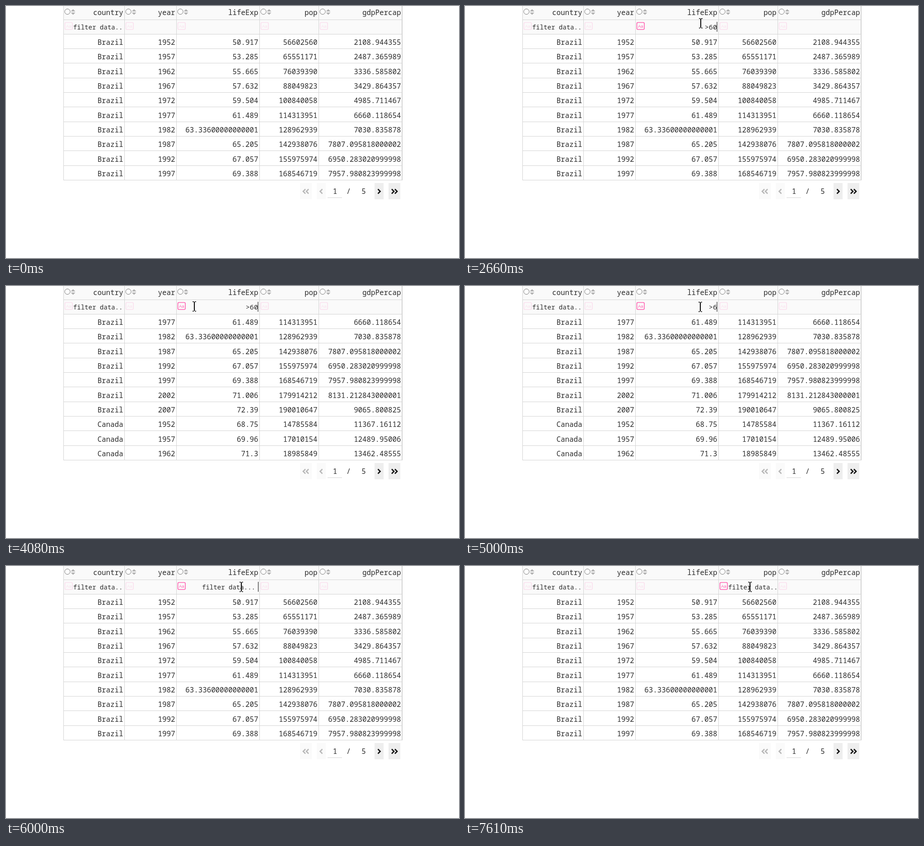
These frames come from a looping animation (1003 by 558 pixels, 8000 ms). An HTML page with a canvas:

```html
<!DOCTYPE html>
<html lang="en">
<head>
<meta charset="utf-8">
<title>Filterable data table</title>
<style>
html, body { margin: 0; width: 100%; height: 100%; overflow: hidden; background: #fff; }
canvas { display: block; }
</style>
</head>
<body>
<canvas id="stage" width="1003" height="558"></canvas>
<script>
const ctx = document.getElementById('stage').getContext('2d');
const LOOP = 8000, TICK = 67, BLINK = 525;
const MONO = '"Noto Sans Mono", "DejaVu Sans Mono", monospace';
const INK = '#2c2c2c', LINE = '#d3d3d3', PINK = '#ff5fb0';
const LIFE = 2, POP = 3;
const edges = [127, 262, 377, 561, 692, 877];
const headings = ['country', 'year', 'lifeExp', 'pop', 'gdpPercap'];
const lineY = k => Math.round(29.5 + 32.3 * k);
const textY = row => Math.round(86 + 32.35 * row);

// lifeExp, pop and gdpPercap for every fifth year from 1952
const history = {
  Brazil: `50.917 56602560 2108.944355
    53.285 65551171 2487.365989
    55.665 76039390 3336.585802
    57.632 88049823 3429.864357
    59.504 100840058 4985.711467
    61.489 114313951 6660.118654
    63.33600000000001 128962939 7030.835878
    65.205 142938076 7807.095818000002
    67.057 155975974 6950.283020999998
    69.388 168546719 7957.980823999998
    71.006 179914212 8131.212843000001
    72.39 190010647 9065.800825`,
  Canada: `68.75 14785584 11367.16112
    69.96 17010154 12489.95006
    71.3 18985849 13462.48555`
};
const records = Object.entries(history).flatMap(([country, lines]) =>
  lines.split('\n').map((line, i) => [country, 1952 + 5 * i, ...line.trim().split(' ')]));
const longLived = records.filter(record => record[2] > 60);

// Pointer moves: start, arrival, x, y
const moves = [
  [130, 260, 645, 42],
  [530, 730, 512, 39],
  [870, 940, 522, 38],
  [3680, 4010, 411, 45],
  [4080, 4490, 521, 46],
  [6610, 7150, 631, 46]
];
const clicks = [[940, LIFE], [7080, POP]];
const typing = [[1860, '>'], [2460, '>6'], [2660, '>60'], [5000, '>6'], [5200, '']];

const latest = (events, t) => events.filter(e => e[0] <= t).pop();
const smooth = p => p * p * (3 - 2 * p);

function pointerAt(t) {
  if (t < moves[0][0]) return null;
  let x = 794, y = 288;
  for (const [start, end, toX, toY] of moves) {
    if (t < start) break;
    const steps = Math.round((end - start) / TICK) + 1;
    const step = Math.floor((t - start + 8) / TICK) + 1;
    const p = smooth(Math.min(1, step / steps));
    x += (toX - x) * p;
    y += (toY - y) * p;
  }
  return [Math.round(x), Math.round(y)];
}

// The blink restarts on each click and each added character
function caretVisible(t) {
  const added = typing.filter(([, value], i) => value.length > i);
  const restarts = [...clicks, ...added].map(e => e[0]).filter(start => start <= t);
  return restarts.length > 0 && Math.floor((t - Math.max(...restarts)) / BLINK) % 2 === 0;
}

function rect(x, y, w, h, color) {
  ctx.fillStyle = color;
  ctx.fillRect(x, y, w, h);
}

function text(value, x, y, size, align = 'right') {
  ctx.font = `${size}px ${MONO}`;
  ctx.textAlign = align;
  ctx.fillStyle = INK;
  ctx.fillText(value, x, y);
}

const cellText = (value, col, y) => text(value, edges[col + 1] - 2.6, y, 15.8);

function triangle(x, y, height) {
  ctx.beginPath();
  ctx.moveTo(x - 5, y);
  ctx.lineTo(x + 5, y);
  ctx.lineTo(x, y + height);
  ctx.fill();
}

function heading(label, col) {
  const x = edges[col];
  ctx.beginPath();
  ctx.arc(x + 9, 12.5, 6, 0, 7);
  ctx.fillStyle = '#fff';
  ctx.fill();
  ctx.strokeStyle = '#767676';
  ctx.lineWidth = 1;
  ctx.stroke();
  ctx.fillStyle = '#b0b0b0';
  triangle(x + 21.5, 12, -5);
  triangle(x + 21.5, 14.5, 5);
  cellText(label, col, 20);
}

function caseIcon(x, active) {
  ctx.save();
  ctx.globalAlpha = active ? 1 : 0.17;
  ctx.strokeStyle = PINK;
  ctx.lineWidth = 1.6;
  ctx.beginPath();
  ctx.roundRect(x + 3.5, 36.5, 16.5, 15.5, 2.5);
  ctx.stroke();
  ctx.font = '9.5px "Liberation Sans", Arial, sans-serif';
  ctx.textAlign = 'center';
  ctx.fillStyle = PINK;
  ctx.fillText('Aa', x + 11.8, 47.5);
  ctx.restore();
}

function placeholder(col) {
  const x = col === LIFE ? 434 : edges[col] + 21.8;
  ctx.save();
  ctx.beginPath();
  ctx.rect(x, 31, edges[col + 1] - 2 - x, 31);
  ctx.clip();
  text('filter data...', x, 52, 14.05, 'left');
  ctx.restore();
}

function filterRow(t, pointer) {
  const hovered = pointer && pointer[1] > 30 && pointer[1] < 62
    ? edges.findIndex((x, i) => pointer[0] >= x && pointer[0] < edges[i + 1]) : -1;
  const focused = latest(clicks, t)?.[1];
  const typed = latest(typing, t)?.[1] ?? '';
  headings.forEach((_, col) => {
    caseIcon(edges[col], col === hovered);
    const empty = col !== LIFE || !typed;
    if (empty && (col === 0 || col === hovered || col === focused)) placeholder(col);
  });
  text(typed, 558, 52, 15.2);
  if (caretVisible(t))
    rect(focused === POP ? 689 : typed ? 557.5 : 558, 35, 1, 22, '#000');
}

function chevron(x, direction, color) {
  ctx.strokeStyle = color;
  ctx.lineWidth = 2.7;
  ctx.beginPath();
  ctx.moveTo(x - 2.5 * direction, 405.5);
  ctx.lineTo(x + 2.5 * direction, 410.5);
  ctx.lineTo(x - 2.5 * direction, 415.5);
  ctx.stroke();
}

function pagerButton(x, width, direction, count, enabled) {
  rect(x, 392, width, 36, enabled ? '#eee' : '#fafafa');
  for (let i = 0; i < count; i++)
    chevron(x + width / 2 + 7 * (i - (count - 1) / 2), direction, enabled ? '#111' : '#b8b8b8');
}

function pager() {
  pagerButton(651, 26, -1, 2, false);
  pagerButton(688, 20, -1, 1, false);
  pagerButton(816, 20, 1, 1, true);
  pagerButton(847, 26, 1, 2, true);
  text('1', 728.5, 416, 15.8, 'center');
  text('/', 758.5, 416, 15.8, 'center');
  text('5', 792, 416, 15.8, 'center');
  rect(712, 424, 32, 1, LINE);
}

function iBeam([x, y]) {
  rect(x - 1, y - 10, 2, 20, '#000');
  for (const top of [y - 11, y + 10]) {
    rect(x - 4, top, 3, 1.4, '#000');
    rect(x + 1, top, 3, 1.4, '#000');
  }
}

function draw(t) {
  rect(0, 0, 1003, 558, '#fff');
  rect(127, 0, 750, 62, '#fafafa');
  for (let k = 0; k < 12; k++) rect(127, lineY(k), 751, 1, LINE);
  edges.forEach(x => rect(x, 0, 1, 386, LINE));
  rect(876, 0, 1, 386, LINE);
  headings.forEach(heading);

  const shown = t >= 3080 && t < 6000 ? longLived : records;
  shown.slice(0, 10).forEach((record, row) =>
    record.forEach((value, col) => cellText(value, col, textY(row))));

  pager();
  const pointer = pointerAt(t);
  filterRow(t, pointer);
  if (pointer) iBeam(pointer);
}

const began = performance.now();
function tick() {
  draw((performance.now() - began) % LOOP);
  requestAnimationFrame(tick);
}
tick();
</script>
</body>
</html>
```
